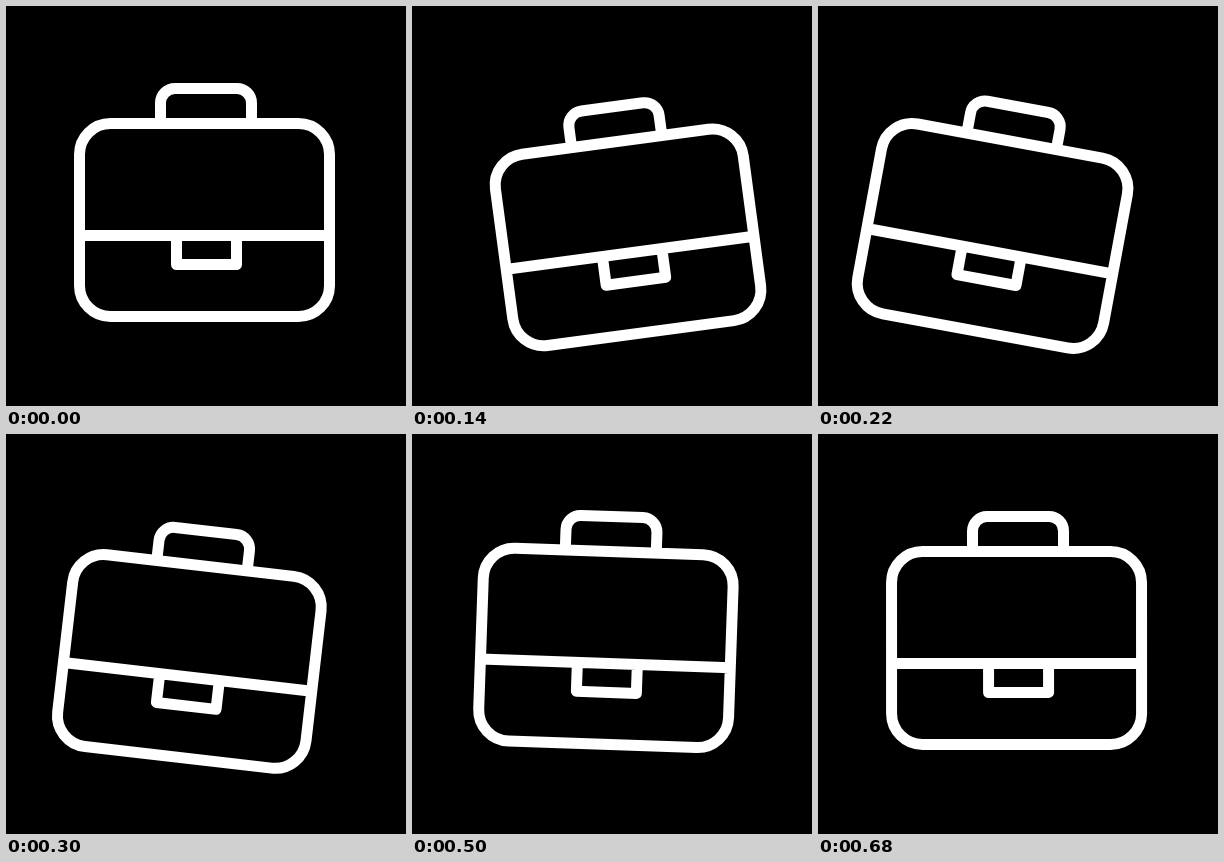
These frames come from a looping animation (400x400 px, 700 ms). An HTML page with a canvas:

```html
<!DOCTYPE html>
<html lang="en">
<head>
<meta charset="utf-8">
<title>Swinging briefcase</title>
<style>
  html, body { margin: 0; width: 100%; height: 100%; overflow: hidden; background: #000; }
  canvas { display: block; width: 400px; height: 400px; }
</style>
</head>
<body>
<canvas id="stage" width="400" height="400"></canvas>
<script>
const ctx = document.getElementById('stage').getContext('2d');
const LOOP = 700;
const STEP = 20;
const PIVOT = { x: 200, y: 82 };

// [time in ms, value]
const SWING = [[0, 0], [120, -9], [242, 12.1], [382, -2.9], [490, 2.05], [600, -0.8], [690, 0], [700, 0]];
const DROP = [[0, 0], [120, 18.4], [265, 18.4], [380, 0], [700, 0]];

function valueAt(keys, t) {
  const i = keys.findIndex(([time]) => time > t);
  const [t0, v0] = keys[i - 1];
  const [t1, v1] = keys[i];
  const eased = (1 - Math.cos(Math.PI * (t - t0) / (t1 - t0))) / 2;
  return v0 + (v1 - v0) * eased;
}

function drawBriefcase() {
  ctx.beginPath();
  // body
  ctx.roundRect(73.5, 117.5, 250, 193, 31);
  // handle
  ctx.moveTo(154.5, 117.5);
  ctx.arcTo(154.5, 82.5, 200, 82.5, 14.5);
  ctx.arcTo(245.5, 82.5, 245.5, 117.5, 14.5);
  ctx.lineTo(245.5, 117.5);
  // flap edge
  ctx.moveTo(73.5, 229.5);
  ctx.lineTo(323.5, 229.5);
  // clasp
  ctx.moveTo(170.5, 229.5);
  ctx.lineTo(170.5, 258.5);
  ctx.lineTo(230.5, 258.5);
  ctx.lineTo(230.5, 229.5);
  ctx.stroke();
}

function render(now) {
  const t = Math.floor((now % LOOP) / STEP) * STEP;
  ctx.setTransform(1, 0, 0, 1, 0, 0);
  ctx.fillStyle = '#000';
  ctx.fillRect(0, 0, 400, 400);

  ctx.translate(PIVOT.x, PIVOT.y + valueAt(DROP, t));
  ctx.rotate(valueAt(SWING, t) * Math.PI / 180);
  ctx.translate(-PIVOT.x, -PIVOT.y);
  ctx.strokeStyle = '#fff';
  ctx.lineWidth = 11;
  ctx.lineJoin = 'round';
  drawBriefcase();
}

const start = performance.now();
function tick() {
  render(performance.now() - start);
  requestAnimationFrame(tick);
}
tick();
</script>
</body>
</html>
```
